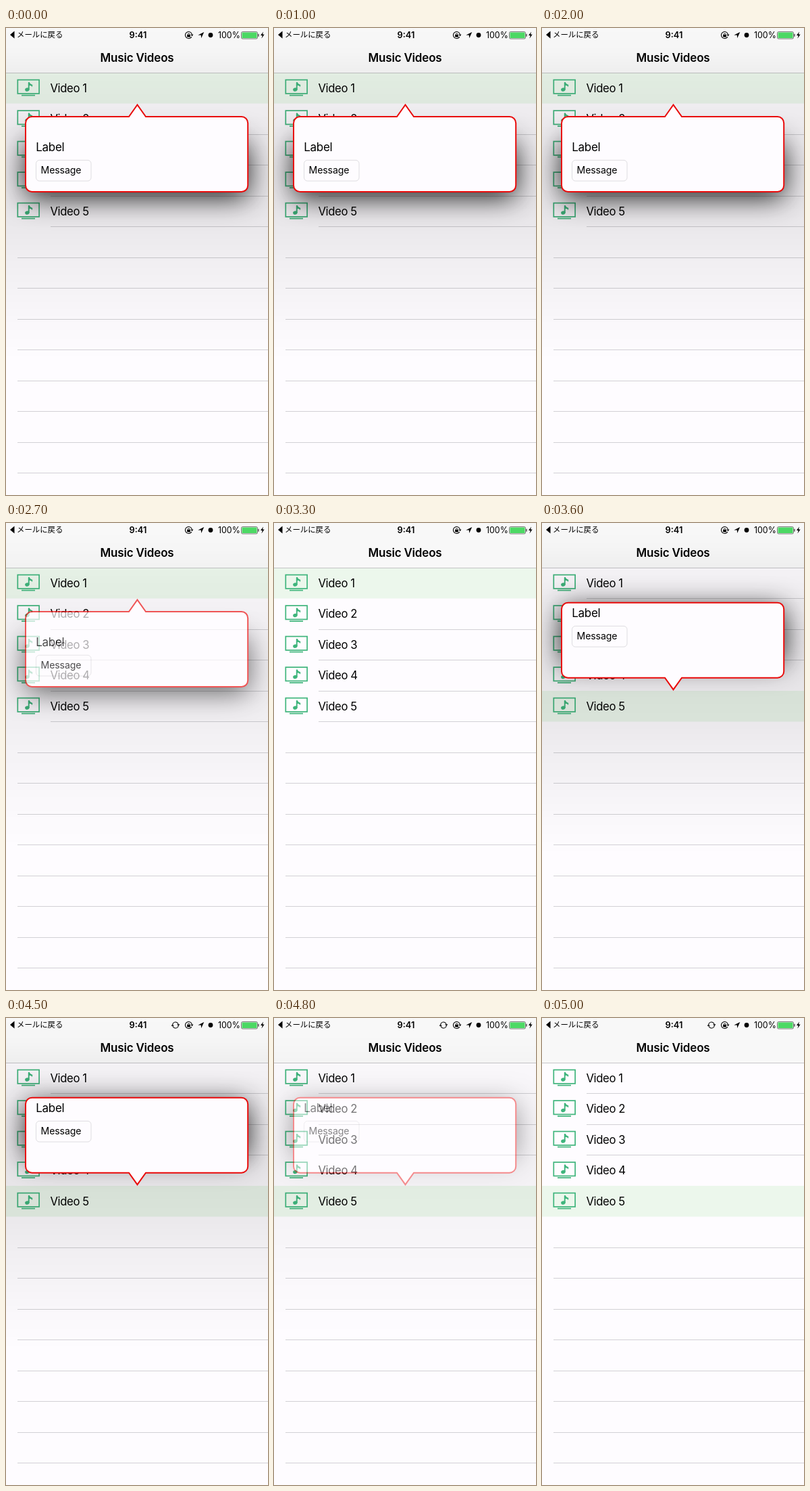
These frames come from a looping animation (388x690 px, 5.1 s). An HTML page with a canvas:

```html
<!DOCTYPE html>
<html lang="ja">
<head>
<meta charset="utf-8">
<style>
html, body { margin: 0; width: 100%; height: 100%; overflow: hidden; background: #fefdfe; }
canvas { display: block; width: 388px; height: 690px; }
</style>
</head>
<body>
<canvas id="stage"></canvas>
<script>
const W = 388, H = 690, LOOP = 5100, STEP = 100;
const ROW = 45.5, TOP = 66, ROWS = 5;
const GREEN = '#3fb57c', RED = '#e90a0a', LINE = '#d2d1d5', PAPER = '#fefcff';
const SANS = 'Inter, Roboto, sans-serif';
const dpr = window.devicePixelRatio || 1;

function setup(canvas) {
  canvas.width = W * dpr;
  canvas.height = H * dpr;
  const c = canvas.getContext('2d');
  c.scale(dpr, dpr);
  return c;
}

function label(c, str, x, y, size, opts = {}) {
  c.font = `${opts.weight || 400} ${size}px ${opts.family || SANS}`;
  c.letterSpacing = (opts.spacing || 0) + 'px';
  c.textAlign = opts.align || 'left';
  c.fillStyle = '#000';
  c.fillText(str, x, y);
}

function poly(c, pts, color = '#000') {
  c.beginPath();
  pts.forEach(([x, y]) => c.lineTo(x, y));
  c.closePath();
  c.fillStyle = color;
  c.fill();
}

function arc(c, x, y, r, from, to, width) {
  c.beginPath();
  c.arc(x, y, r, from, to);
  c.lineWidth = width;
  c.strokeStyle = '#000';
  c.stroke();
}

function tvIcon(c, y) {
  c.strokeStyle = c.fillStyle = GREEN;
  c.lineWidth = 1.7;
  c.strokeRect(17.3, y + 10.6, 31.8, 20.3);
  c.fillRect(23, y + 32.7, 20, 1.7);
  c.beginPath();
  c.ellipse(31.4, y + 25, 3.3, 2.6, -0.3, 0, 7);
  c.fill();
  c.fillRect(32.8, y + 14.5, 1.9, 10.5);
  poly(c, [[33, y + 14], [34.7, y + 14], [36, y + 16.3], [39.3, y + 18],
    [39, y + 21], [37, y + 19.3], [34, y + 18.8]], GREEN);
}

function statusBar(c, syncing) {
  poly(c, [[6, 10], [12.5, 4.5], [12.5, 15.5]]);
  label(c, 'メールに戻る', 16, 14.2, 11.4, { family: '"Noto Sans CJK JP", "Noto Sans CJK", sans-serif' });
  label(c, '9:41', 195.5, 15, 12.8, { weight: 600, align: 'center' });
  label(c, '100%', 314, 15, 12.4);

  if (syncing) {
    arc(c, 251, 10.5, 4.4, Math.PI * 1.08, Math.PI * 1.88, 1.1);
    arc(c, 251, 10.5, 4.4, Math.PI * 0.08, Math.PI * 0.88, 1.1);
    poly(c, [[253.2, 9.3], [257.4, 9.3], [255.4, 12]]);
    poly(c, [[244.6, 11.7], [248.8, 11.7], [246.6, 9]]);
  }

  // rotation lock
  arc(c, 270.5, 10.5, 5, 0.5, Math.PI * 1.93, 1.1);
  poly(c, [[273.5, 9.6], [277.5, 9.6], [275.5, 12.2]]);
  c.fillRect(268.2, 9.8, 4.8, 3.7);
  arc(c, 270.6, 9.6, 1.5, Math.PI, 0, 0.9);

  poly(c, [[293.3, 6], [284.3, 10.4], [288.8, 10.6], [289.1, 15]]);
  c.beginPath();
  c.arc(303, 10.5, 3.4, 0, 7);
  c.fill();

  // battery
  c.beginPath();
  c.roundRect(348.5, 5.5, 24, 10.5, 2);
  c.lineWidth = 0.7;
  c.strokeStyle = '#444';
  c.stroke();
  c.fillStyle = '#4cd964';
  c.fillRect(349.5, 6.5, 22, 8.5);
  c.fillStyle = '#444';
  c.fillRect(373.3, 8.8, 1.3, 3.8);
  poly(c, [[381, 5.5], [377, 11], [379.6, 11], [378.4, 15.5], [382.6, 9.6], [380, 9.6]]);
}

function screen(c, selected, syncing) {
  c.fillStyle = PAPER;
  c.fillRect(0, 0, W, H);
  c.fillStyle = '#f8f8f8';
  c.fillRect(0, 0, W, TOP);
  c.fillStyle = '#ecf7ec';
  c.fillRect(0, TOP + selected * ROW, W, ROW);

  c.fillStyle = LINE;
  for (let i = 1; i <= 13; i++) {
    if (i === selected + 1 || (selected > 0 && i === selected)) continue;
    const x = i <= ROWS ? 66 : 17;
    c.fillRect(x, Math.round(TOP + i * ROW - 0.5), W - x, 1);
  }
  c.fillStyle = '#b9b9bc';
  c.fillRect(0, TOP, W, 0.8);

  for (let i = 0; i < ROWS; i++) {
    const y = TOP + i * ROW;
    tvIcon(c, y);
    label(c, 'Video ' + (i + 1), 65.5, y + 28.5, 16.7, { spacing: -0.4 });
  }
  label(c, 'Music Videos', 194, 49.7, 17, { weight: 600, spacing: -0.2, align: 'center' });
  statusBar(c, syncing);
}

function bubblePath(c, top, bottom, arrowUp) {
  const l = 29, r = 358.2, rad = 9.5, mid = 194.5, half = 12.5;
  c.beginPath();
  c.moveTo(l + rad, top);
  if (arrowUp) {
    c.lineTo(mid - half, top);
    c.lineTo(mid, top - 17.5);
    c.lineTo(mid + half, top);
  }
  c.arcTo(r, top, r, bottom, rad);
  c.arcTo(r, bottom, l, bottom, rad);
  if (!arrowUp) {
    c.lineTo(mid + half, bottom);
    c.lineTo(mid, bottom + 17.5);
    c.lineTo(mid - half, bottom);
  }
  c.arcTo(l, bottom, l, top, rad);
  c.arcTo(l, top, r, top, rad);
  c.closePath();
}

// Bubble, its shadows and content as one layer, so it can fade as a whole
function makePopover(top, contentY, arrowUp) {
  const layer = document.createElement('canvas');
  const c = setup(layer);

  const haze = c.createLinearGradient(0, 0, 0, 500);
  [[0, 0], [35, 0.012], [66, 0.04], [110, 0.06], [210, 0.085], [260, 0.088],
    [300, 0.075], [340, 0.056], [400, 0.031], [440, 0.015], [490, 0]]
    .forEach(([y, a]) => haze.addColorStop(y / 500, `rgba(0,0,0,${a})`));
  c.fillStyle = haze;
  c.fillRect(0, 0, W, 500);

  c.save();
  c.shadowColor = 'rgba(0,0,0,0.9)';
  c.shadowBlur = 42 * dpr;
  c.shadowOffsetX = 1000 * dpr;
  c.fillStyle = '#000';
  c.fillRect(30 - 1000, contentY + 20, 328, 80);
  c.restore();

  bubblePath(c, top, top + 111, arrowUp);
  c.fillStyle = PAPER;
  c.fill();
  c.lineWidth = 2;
  c.strokeStyle = RED;
  c.stroke();

  label(c, 'Label', 44.3, contentY + 32.2, 17, { spacing: -0.3 });
  c.beginPath();
  c.roundRect(44.5, contentY + 45.3, 81.5, 30.7, 5);
  c.lineWidth = 1;
  c.strokeStyle = '#dedde0';
  c.stroke();
  label(c, 'Message', 51.5, contentY + 65.3, 14.1, { spacing: -0.1 });
  return layer;
}

const stage = document.getElementById('stage');
const ctx = setup(stage);
const below = makePopover(131, 150, true);
const above = makePopover(117.7, 107, false);

// Cosine ease from 0 to 1
function ease(t, start, length) {
  const u = Math.min(1, Math.max(0, (t - start) / length));
  return (1 - Math.cos(Math.PI * u)) / 2;
}

function draw(now) {
  const t = Math.floor((now % LOOP) / STEP) * STEP;
  const second = t >= 3500;
  screen(ctx, second ? 4 : 0, t >= 4100);
  ctx.globalAlpha = second
    ? ease(t, 3400, 180) * (1 - ease(t, 4580, 420))
    : 1 - ease(t, 2520, 480);
  ctx.drawImage(second ? above : below, 0, 0, W, H);
  ctx.globalAlpha = 1;
}

const began = performance.now();
function tick() {
  draw(performance.now() - began);
  requestAnimationFrame(tick);
}
tick();
</script>
</body>
</html>
```
